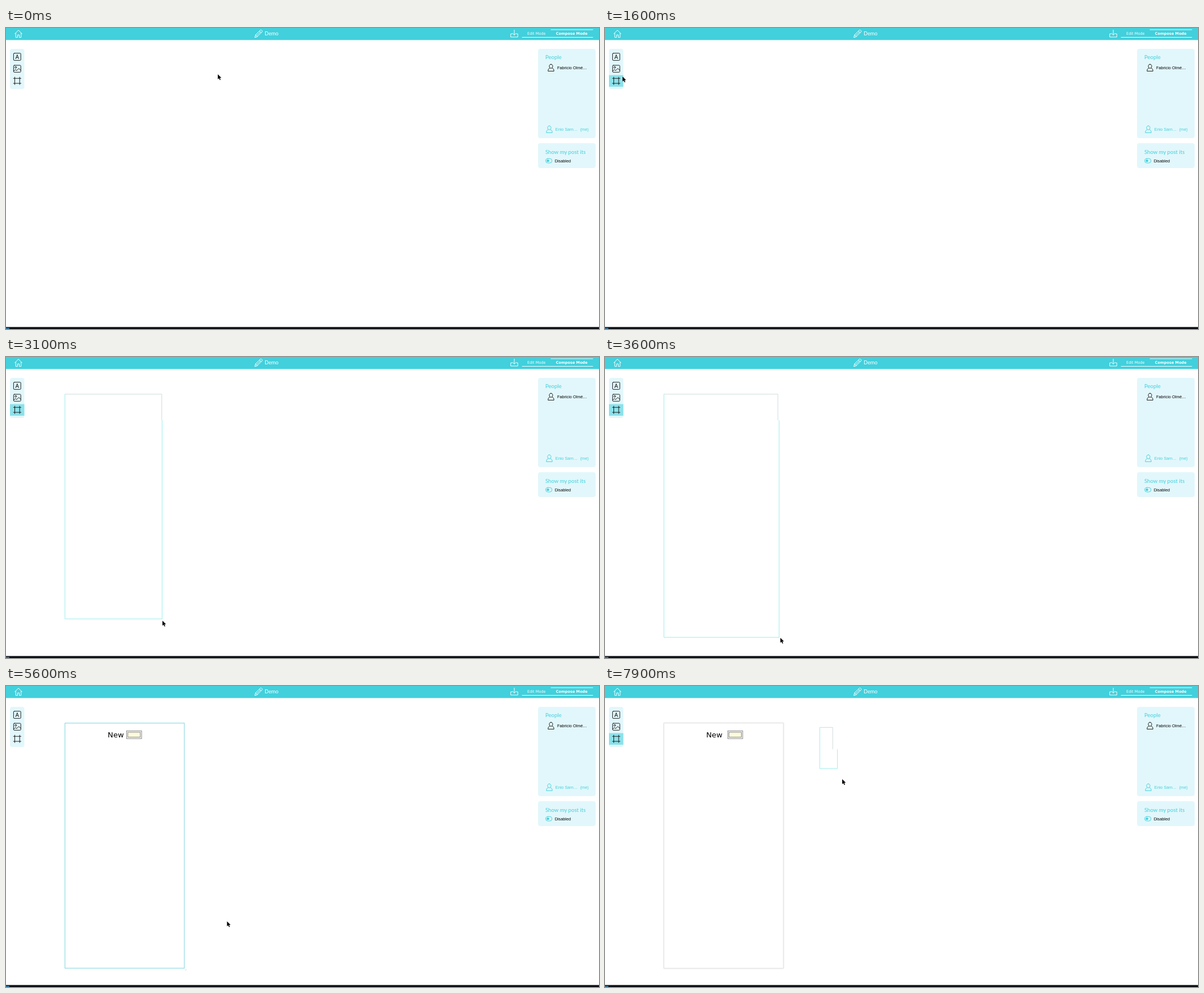
Write an HTML page that moves like this. It is 1050 px wide and 533 px high and loops after 8 s.

```html
<!DOCTYPE html>
<html lang="en">
<head>
<meta charset="utf-8">
<title>Board demo</title>
<style>
  html, body { margin: 0; width: 100%; height: 100%; overflow: hidden; background: #fff; }
  svg { display: block; width: 100%; height: 100%; }
  .line { fill: none; stroke-width: .95; stroke-linejoin: round; stroke-linecap: round; }
  .ui { font: 7.29px "Liberation Sans", Arial, sans-serif; }
  .title { font: 9.6px Lato, sans-serif; }
  .tab { font: 6.56px "DejaVu Sans", sans-serif; }
  .note { font: 13.1px "DejaVu Sans", sans-serif; }
  .bold { font-weight: bold; }
  #placed.idle { stroke: #dedede; filter: drop-shadow(0 0 1.2px rgba(0, 0, 0, .16)); }
</style>
</head>
<body>
<svg viewBox="0 0 1050 533">
  <defs>
    <path id="person" class="line" d="M0 -5.7c2 0 3 1.4 3 3.3s-1.2 3.7-3 3.7-3-1.8-3-3.7 1-3.3 3-3.3zM-2 1c-2 .8-3.2 1.6-3.2 5.4H5.2C5.2 2.600 4 1.800 2 1"/>
  </defs>

  <!-- Header -->
  <rect width="1050" height="21.300" fill="#41d0dc"/>
  <g class="line" stroke="#fff">
    <path d="M15.500 10.400 22 3.800l6.500 6.600M17.300 9v7.700h3.200v-4.500h3v4.500h3.200V9"/>
    <path d="M440.700 16.500l1.100-4.300 8.600-8.500q1-.8 2 .1l1 1q.9 1 0 2l-8.500 8.600zM441.800 12.200l3.100 3.200M448.700 5.400l3.200 3.200M443.700 13.600l6.500-6.400"/>
    <path d="M900 3.500v8.800M896.800 9.300l3.200 3.200 3.200-3.200M896 10.300h-2.300v5.700h12.500v-5.700H904"/>
    <path d="M914 16.500h125M965 3h74"/>
  </g>
  <g fill="#fff">
    <text class="title" x="458" y="13" style="font-size:9.2px">Demo</text>
    <text class="tab" x="923" y="12">Edit Mode</text>
    <text class="tab bold" x="973.700" y="12">Compose Mode</text>
  </g>

  <!-- Side panels -->
  <g fill="#e2f7fb">
    <rect x="7" y="37" width="25.500" height="71" rx="4"/>
    <rect x="942" y="37" width="102" height="158" rx="4"/>
    <rect x="942" y="204" width="102" height="44" rx="4"/>
  </g>
  <rect id="highlight" x="7" y="83.500" width="25.500" height="20.500" fill="#8ce1ea"/>
  <g class="line" stroke="#111">
    <rect x="13.400" y="44.600" width="12.800" height="12.800" rx="1.500"/>
    <path d="M17.200 54.500l2.600-7.200 2.600 7.200M18.100 52.200h3.400"/>
    <rect x="13.400" y="66" width="12.800" height="12.300" rx="1.500"/>
    <circle cx="17.200" cy="69.700" r="1.500"/>
    <path d="M13.600 76.300l3-2.600 2.500 1.600 3.600-3.800 3.400 3.500"/>
    <path d="M15.500 87v13.200M24.200 87v13.200M13.200 89.200h13.400M13.200 98h13.400"/>
  </g>
  <use href="#person" x="965" y="70" stroke="#111"/>
  <use href="#person" x="962" y="179" stroke="#41d0dc"/>
  <g class="line" stroke="#41d0dc">
    <rect x="955.600" y="231.200" width="11.200" height="7.800" rx="3.900"/>
    <circle cx="959.500" cy="235.100" r="1.800" fill="#41d0dc"/>
  </g>
  <g fill="#41d0dc">
    <text class="title" x="955" y="55.300">People</text>
    <text class="title" x="955" y="222.600">Show my post its</text>
    <text class="ui" x="972.800" y="181.700">Enio Sarn…</text>
    <text class="ui" x="1016.700" y="181.700">(me)</text>
  </g>
  <text class="ui" x="976" y="72.700">Fabricio Olmé…</text>
  <text class="ui" x="971.700" y="237.800">Disabled</text>

  <!-- Bottom strip -->
  <rect y="529.500" width="1050" height="3.500" fill="#0b0f14"/>
  <rect y="531" width="6" height="2" fill="#2d6c94"/>

  <!-- Board -->
  <g id="panel">
    <rect id="placed" x="104.300" y="65.800" width="211.500" height="434" fill="#fff" stroke="#5cc9d6" stroke-width=".8"/>
    <path id="grip" d="M317.500 503.500l2-2M319 503.700l.7-.7" stroke="#aaa" stroke-width=".5"/>
    <text id="label" class="note" y="90.600"></text>
    <path id="caret" stroke="#000" stroke-width=".9"/>
    <g id="swatch" stroke="#777" stroke-width=".8">
      <rect x=".3" y="79.300" width="26.600" height="13.900" fill="#efefef"/>
      <rect x="2.500" y="82" width="22" height="8.400" fill="#fcfadd"/>
    </g>
  </g>
  <g fill="none" stroke-width=".8">
    <path id="dragNew" stroke="#84e9e9"/>
    <path id="dragOld" stroke="#c4d2d3"/>
  </g>

  <!-- Pointers -->
  <g id="pointer" stroke="#fff" stroke-width=".5" paint-order="stroke">
    <path id="arrow" d="M0 0V8.800L2.100 7l1.500 3.300L5 9.700 3.600 6.500l2.700-.2z"/>
    <path id="hand" d="M0 .4Q.8-.5 1.600.5L2.200 2.400 5.500 3q1 .3.900 1.500L5.900 8.700H1.700L-.8 5.200Q-.6 4 .8 5z"/>
    <path id="resize" d="M-3.800-4.200l1-.8 3.400 3.500L2-3V2h-5l1.500-1.300zM2.700-4h1.400v8.200h-8.400V2.800h7z"/>
  </g>
</svg>
<script>
const DURATION = 8000, STEP = 100, LAG = 40, TEAR_Y = 112;
const $ = id => document.getElementById(id);
const show = (id, on) => $(id).style.display = on ? '' : 'none';

// Pointer path: time in seconds, x, y
const path = [
  [0, 375, 82], [.5, 375, 82], [.6, 368, 80], [.8, 280, 66], [.9, 210, 63], [1, 130, 66],
  [1.1, 65, 78], [1.2, 32, 88], [1.4, 24, 91], [1.5, 26, 91], [1.6, 31, 86], [1.8, 60, 68],
  [2.1, 103, 62], [2.2, 104, 65], [2.3, 111, 88], [2.6, 175, 240], [2.8, 230, 370],
  [3, 275.5, 459], [3.1, 277, 467], [3.2, 281, 481], [3.5, 305, 495], [3.7, 316, 499.5],
  [3.8, 316, 499], [4, 313, 490], [4.1, 311.5, 485], [4.2, 314, 490], [5.4, 314, 490],
  [5.7, 430, 380], [5.9, 475, 300], [6, 400, 220], [6.2, 120, 130], [6.3, 16, 112],
  [6.4, 22, 102], [6.5, 27, 100], [6.6, 27, 100], [6.7, 32, 98], [6.9, 220, 115],
  [7.1, 425, 141], [7.2, 418, 118], [7.3, 385, 76], [7.4, 374, 68], [7.6, 380, 73],
  [7.7, 388, 80], [7.8, 399, 118], [7.9, 420, 165], [8, 440, 210]
];

function pointerAt(ms) {
  const t = ms / 1000;
  const i = Math.max(1, path.findIndex(p => p[0] >= t));
  const [a, b] = [path[i - 1], path[i]];
  const k = (t - a[0]) / (b[0] - a[0]);
  return [a[1] + (b[1] - a[1]) * k, a[2] + (b[2] - a[2]) * k];
}

// The dragged outline trails the pointer; its upper part trails twice as far.
function drawDrag(t) {
  const drag = [[2200, 3700, 104.3, 65.8], [7600, DURATION, 380.3, 73.3]]
    .find(([start, end]) => t > start && t < end);
  show('dragNew', drag);
  show('dragOld', drag);
  if (!drag) return;
  const [start, , x, y] = drag;
  const [right, bottom] = pointerAt(Math.max(start, t - LAG));
  const oldRight = pointerAt(Math.max(start, t - 2 * LAG))[0];
  const torn = bottom > TEAR_Y;
  $('dragNew').setAttribute('d', torn
    ? `M${x} ${y}V${bottom}H${right}V${TEAR_Y}`
    : `M${x} ${y}V${bottom}H${right}V${y}Z`);
  $('dragOld').setAttribute('d', torn ? `M${x} ${y}H${oldRight}V${TEAR_Y}` : '');
}

function drawPanel(t) {
  const editing = t < 5900;
  show('panel', t >= 3700);
  show('grip', editing);
  $('placed').classList.toggle('idle', !editing);

  const text = 'New'.slice(0, t < 4700 ? 0 : t < 5000 ? 1 : t < 5100 ? 2 : 3);
  const label = $('label');
  label.textContent = text;
  const width = text && t >= 3700 ? label.getComputedTextLength() : 0;
  const left = editing ? 194.4 - width / 2 : 179.3;
  label.setAttribute('x', left);
  $('swatch').setAttribute('transform', `translate(${editing ? 199 + width / 2 : 217})`);
  $('caret').setAttribute('d', `M${left + width} ${text ? 78 : 80}v15.7`);
  show('caret', t < 4500 || (t >= 4700 && t < 5600));
}

function drawPointer(t) {
  const [x, y] = pointerAt(t);
  const resizing = t >= 4200 && t < 5500;
  const overTool = x < 30 && y > 83 && y < 106;
  $('pointer').setAttribute('transform', `translate(${x} ${y})`);
  show('resize', resizing);
  show('hand', overTool);
  show('arrow', !resizing && !overTool);
}

function render(now) {
  const t = Math.floor(now % DURATION / STEP) * STEP;
  const selected = (t >= 1300 && t < 3700) || t >= 6400;
  $('highlight').style.opacity = selected ? (t < 1500 ? .6 : 1) : 0;
  drawPanel(t);
  drawDrag(t);
  drawPointer(t);
}

const begin = performance.now();
function tick() {
  render(performance.now() - begin);
  requestAnimationFrame(tick);
}
tick();
</script>
</body>
</html>
```
